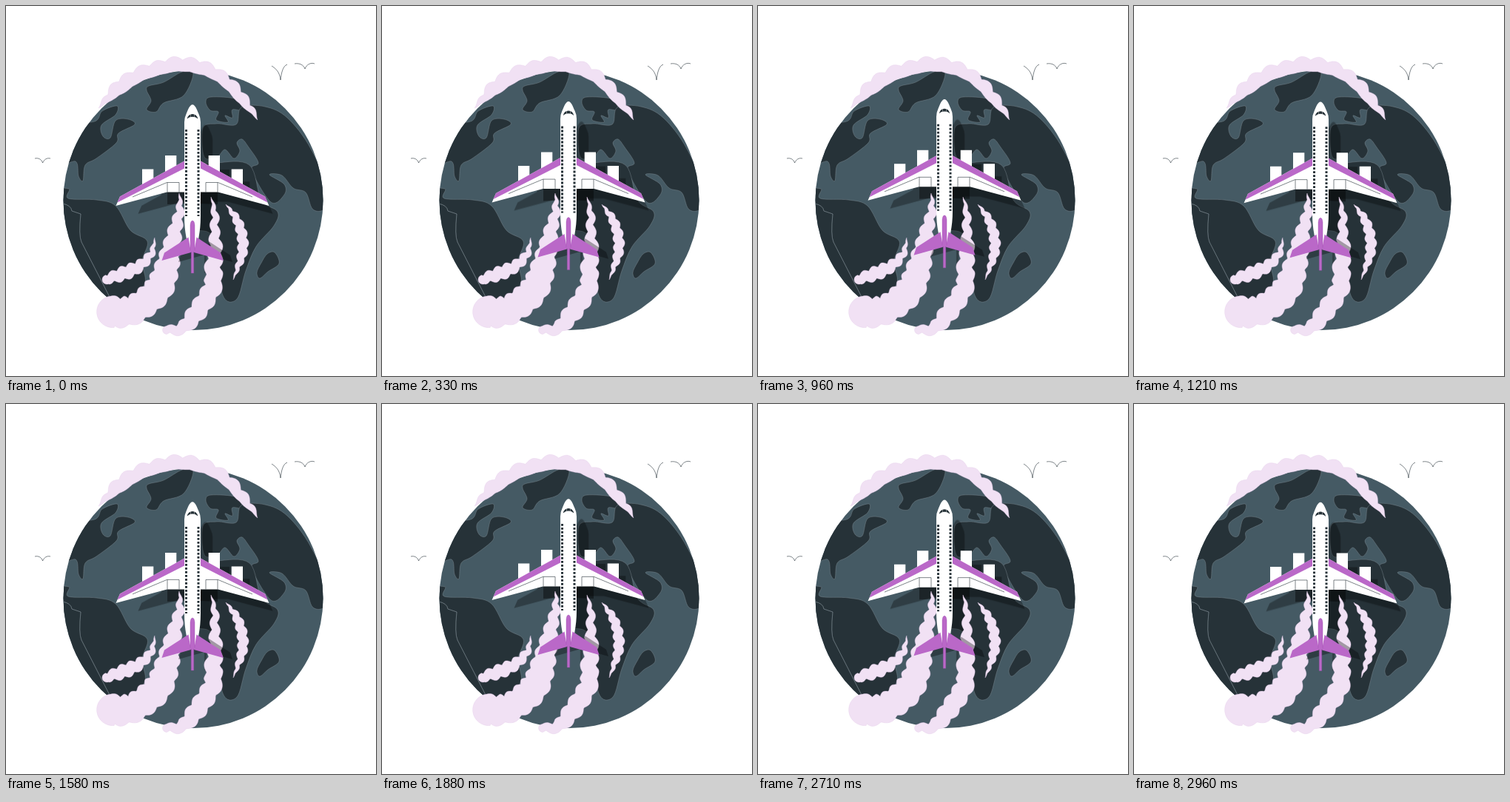
Animation of 500 by 500 pixels, one loop 3 s. Source, as an HTML page:

```html
<!DOCTYPE html>
<html lang="en">
<head>
<meta charset="utf-8">
<title>Plane over the globe</title>
<style>
html, body { margin: 0; width: 100%; height: 100%; overflow: hidden; background: #fff; }
svg { display: block; width: 100vw; height: 100vh; }
</style>
</head>
<body>
<svg viewBox="0 0 500 500">
  <defs>
    <clipPath id="disc"><circle cx="253" cy="262.500" r="175.500"/></clipPath>
    <path id="engines" d="M215 202h15.300v24h-15.300zM184 220.500h15.300v22h-15.300z"/>
    <path id="wing" d="M242 209L154 257.500L148.500 270L217.500 251.500H242Z"/>
    <path id="stabilizer" d="M246.500 312.500L214 333.500L210.500 344L250 333Z"/>
    <path id="body" d="M252 133.300C248.500 133.300 246 140 243.500 146Q241 151 241 157V285C241 305 245 322 249 332H255C259 322 263 305 263 285V157Q263 151 260.500 146C258 140 255.500 133.300 252 133.300Z"/>
    <path id="fin" d="M249 330V296Q249.500 290 252 290Q254.500 290 255 296V330L253.700 333V361H250.300V333Z"/>
    <g id="tail">
      <use href="#stabilizer"/>
      <use href="#stabilizer" transform="matrix(-1 0 0 1 504 0)"/>
    </g>
    <g id="halfWings"><use href="#engines"/><use href="#wing"/></g>
    <g id="paintedWing">
      <use href="#engines" fill="#fff"/>
      <use href="#wing" fill="#fff"/>
      <path d="M242 209L154 257.500L150.500 265.500L242 219Z" fill="#ba68c8"/>
      <path d="M171 258L217.500 238.500H234V251.500M218 238.500V251.500" fill="none" stroke="#263238" stroke-width=".6"/>
    </g>
    <path id="flapShadow" d="M218 245H242V267L218 268Z"/>
  </defs>

  <circle cx="253" cy="262.500" r="175.500" fill="#455a64"/>
  <g id="land" clip-path="url(#disc)" fill="#263238" stroke="#87949a" stroke-width=".4"/>
  <g class="float" opacity=".32">
    <g transform="translate(47.740 43.320) scale(.88)">
      <use href="#halfWings"/>
      <use href="#halfWings" transform="matrix(-1 0 0 1 504 0)"/>
      <use href="#body"/><use href="#fin"/>
    </g>
  </g>
  <g class="float" opacity=".4">
    <use href="#flapShadow"/>
    <use href="#flapShadow" transform="matrix(-1 0 0 1 504 0)"/>
  </g>
  <g id="clouds" fill="#f1e1f4" stroke="#e3c9e9" stroke-width=".4"/>
  <g class="float" opacity=".32">
    <use href="#tail" transform="translate(47.740 43.320) scale(.88)"/>
  </g>

  <g class="float">
    <use href="#paintedWing"/>
    <use href="#paintedWing" transform="matrix(-1 0 0 1 504 0)"/>
    <use href="#body" fill="#fff"/>
    <path d="M243.500 167V284M260 167V284" stroke="#263238" stroke-width="3" stroke-dasharray="2.800 2.200"/>
    <path d="M244.800 152.500Q246 146 252 146Q258 146 259.200 152.500L256.500 150.500Q252 148.800 247.500 150.500Z" fill="#263238"/>
    <path d="M249.500 146V150.500M254.500 146V150.500" stroke="#fff" stroke-width=".4"/>
    <use href="#tail" fill="#ba68c8"/>
    <use href="#fin" fill="#ba68c8" stroke="#9c4fab" stroke-width=".4"/>
  </g>

  <path d="M359 81C364 84 370 89 371 100C372 91 374 81 380 79M390 78C396 77 402 79 404 85C406 79 412 76 417 78M39 206C44 205 48 207 49.500 212C52 207 55 205 60 206" fill="none" stroke="#263238" stroke-width=".6"/>
</svg>
<script>
// Closed Catmull-Rom curve through a few key points
function coast(text) {
  const pts = text.trim().split(/\s+/).map(p => p.split(',').map(Number));
  const n = pts.length, at = i => pts[(i + n) % n];
  const handle = (i, sign) =>
    [0, 1].map(k => at(i)[k] + sign * (at(i + 1)[k] - at(i - 1)[k]) / 6);
  return `M${pts[0]}` + pts.map((_, i) =>
    `C${handle(i, 1)} ${handle(i + 1, -1)} ${at(i + 1)}`).join('') + 'Z';
}

function spline(keys, steps = 24) {
  const at = i => keys[Math.max(0, Math.min(keys.length - 1, i))];
  const count = (keys.length - 1) * steps;
  return Array.from({ length: count + 1 }, (_, j) => {
    const i = Math.min(Math.floor(j / steps), keys.length - 2), t = j / steps - i;
    return [0, 1, 2].map(k => {
      const [a, b, c, d] = [-1, 0, 1, 2].map(o => at(i + o)[k]);
      return b + t / 2 * (c - a + t * (2 * a - 5 * b + 4 * c - d + t * (3 * (b - c) + d - a)));
    });
  });
}

// Smoke along keys of [x, y, half width]; both edges swell in regular lumps
function plume(keys, lump, swell, innerSwell = swell) {
  const pts = spline(keys), outer = [], inner = [];
  let run = 0;
  pts.forEach(([x, y, w], i) => {
    const prev = pts[i - 1] || pts[i], next = pts[i + 1] || pts[i];
    const dx = next[0] - prev[0], dy = next[1] - prev[1], len = Math.hypot(dx, dy);
    const nx = dy / len, ny = -dx / len;
    run += Math.hypot(x - prev[0], y - prev[1]);
    const reach = (size, shift) => Math.max(0, w + Math.min(w, size) *
      (Math.abs(Math.sin(Math.PI * (run / lump + shift))) - .6));
    const a = reach(swell, 0), b = reach(innerSwell, .5);
    outer.push([x + nx * a, y + ny * a]);
    inner.unshift([x - nx * b, y - ny * b]);
  });
  return `M${outer.join('L')}A1 1 0 0 1 ${inner.join('L')}Z`;
}

function add(id, d) {
  const path = document.createElementNS('http://www.w3.org/2000/svg', 'path');
  path.setAttribute('d', d);
  document.getElementById(id).append(path);
}

const lands = {
  greenland: `253,91 238,89 213,103 193,108 190,114 196,128 190,140 203,143
    213,131 240,121`,
  northAmerica: `95,165 122,155 130,142 150,135 148,147 129,161 131,176 141,178
    148,155 165,153 174,160 152,172 149,185 122,206 107,215 104,236 98,230 94,210 70,215`,
  southAmerica: `60,255 85,247 84,260 122,262 148,270 168,303 191,318 184,345
    188,374 170,392 143,400 100,400 60,320`,
  scandinavia: `270,130 277,123 312,126 322,141 306,140 306,151 296,148 300,157
    284,154 287,143 276,141`,
  eurasia: `318,137 350,136 380,151 412,193 440,260 428,276 414,274 405,252 388,246
    373,229 356,228 376,241 376,255 358,265 332,222 341,212 328,191 319,180 312,185
    316,196 308,206 296,194 286,203 268,204 266,165 285,159 311,160`,
  africa: `255,220 285,212 329,215 345,262 367,278 362,297 338,325 324,358 312,396
    293,391 284,325 274,306 248,299 242,265`,
  island: `353,335 363,333 369,348 354,359 343,368 339,360 345,347`
};
Object.values(lands).forEach(text => add('land', coast(text)));
add('land', 'M76 267Q88 269 89 277L101 281Q98 310 102 319L143 399L102 319Q98 310 101 281L89 277Q88 269 76 267Z');

// Band over the rim, then the four trails
add('clouds', plume([[125, 138, 0], [151, 112, 9], [180, 93, 9], [204, 85, 9], [232, 79, 9],
  [262, 83, 9], [285, 93, 8], [304, 108, 8], [320, 127, 7], [332, 141, 4], [340, 154, 0]], 22, 5, 1));
add('clouds', plume([[234, 253, 0], [235, 275, 5], [228, 305, 9], [219, 347, 15],
  [205, 384, 19], [173, 410, 19], [144, 414, 21]], 17, 4));
add('clouds', plume([[277, 258, 0], [282, 280, 4], [282, 305, 6], [283, 330, 9],
  [280, 355, 11], [279, 380, 12], [257, 415, 12], [238, 435, 8], [217, 438, 5]], 19, 4));
add('clouds', plume([[201, 313, 0], [197, 333, 4], [182, 350, 7], [160, 361, 9],
  [136, 369, 6]], 14, 4));
add('clouds', plume([[297, 268, 0], [311, 287, 5], [319, 310, 6.5], [319, 335, 6],
  [307, 370, 0]], 13, 3));

const floating = document.querySelectorAll('.float');
const period = 1500, lift = 10;

function draw() {
  const phase = performance.now() % period / period;
  const y = -lift * (1 - Math.abs(1 - 2 * phase));
  floating.forEach(g => g.setAttribute('transform', `translate(0 ${y})`));
  requestAnimationFrame(draw);
}
draw();
</script>
</body>
</html>
```
